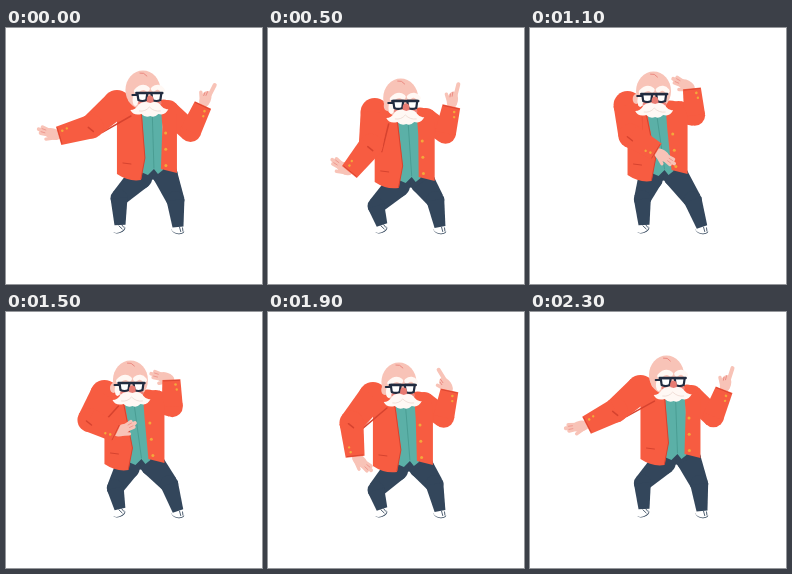
Recreate the animation shown at these times as an HTML page with a canvas. Size 256x256 px, loop 2400 ms.

```html
<!DOCTYPE html>
<html>
<head>
<meta charset="utf-8">
<style>
html, body { margin: 0; height: 100%; overflow: hidden; background: #fff; }
canvas { display: block; width: 100vw; height: 100vh; }
</style>
</head>
<body>
<canvas id="stage" width="256" height="256"></canvas>
<script>
const ctx = document.getElementById('stage').getContext('2d');
const RED = '#f75c41', SHADE = '#d6432f', TEAL = '#5bb0a7', DARK_TEAL = '#46988f';
const NAVY = '#33465b', INK = '#222c40', SKIN = '#f8c3b7', BLUSH = '#e9837b';
const WHITE = '#fff8f4', GOLD = '#f3a83b';
const STEP = 100, STEPS = 24, RAD = Math.PI / 180;

function fill(color, path) {
  ctx.fillStyle = color;
  ctx.fill(new Path2D(path));
}

function line(color, width, path) {
  ctx.strokeStyle = color;
  ctx.lineWidth = width;
  ctx.stroke(new Path2D(path));
}

function oval(color, x, y, rx, ry = rx) {
  const p = new Path2D();
  p.ellipse(x, y, rx, ry, 0, 0, 7);
  fill(color, p);
}

function at(x, y, angle, draw) {
  ctx.save();
  ctx.translate(x, y);
  ctx.rotate(angle);
  draw();
  ctx.restore();
}

// Tapered limb through [x, y, radius] joints with a flat end
function limb(color, ...joints) {
  joints.slice(1).forEach(([x, y, r], i) => {
    const [px, py, pr] = joints[i], length = Math.hypot(x - px, y - py);
    oval(color, px, py, pr);
    at(px, py, Math.atan2(y - py, x - px), () =>
      fill(color, `M0 ${-pr}L${length} ${-r}V${r}L0 ${pr}Z`));
  });
}

// Cosine over the loop, peaking at the given step
const wave = (t, peak, times = 1) => Math.cos(2 * Math.PI * times * (t - peak) / STEPS);

// Soft bump around the given step
const pulse = (t, peak, width) => Math.exp(-(((t - peak) / width) ** 2));

function poseAt(t) {
  const sway = wave(t, 0), curl = wave(t, 2.9), fling = pulse(t, 2, 1.3);
  const hx = 130 + 7 * wave(t, .5), hy = 65 - 8 * sway ** 4;

  // Left arm swings about the shoulder; the elbow bends off its midline
  const swing = (102 + 43 * wave(t, .3) + 5 * wave(t, 0, 3) + 15 * fling) * RAD;
  const reach = 65 + 16 * fling - 27 * pulse(t, 14, 3), bend = 5 - 17 * curl;
  const sx = hx - 26, sy = hy + 19, ux = Math.cos(swing), uy = Math.sin(swing);
  const left = {
    shoulder: [sx, sy, 14],
    elbow: [sx + ux * reach / 2 - uy * bend, sy + uy * reach / 2 + ux * bend, 12],
    wrist: [sx + ux * reach, sy + uy * reach, 9.5],
    angle: 1.8 + 2.3 * curl
  };

  const rx = hx + 25, ry = hy + 26;
  const right = {
    shoulder: [rx, ry, 11],
    elbow: [rx + 19 + 3 * sway + 6 * fling, ry + 12 + 9 * sway - 4 * fling, 10.5],
    wrist: [rx + 23 + 10 * sway + 22 * fling, ry - 15 + 9 * sway, 9],
    angle: -2 + .9 * wave(t, 1.8) + .3 * fling
  };
  return { hx, hy, bx: hx - 2, by: hy + 95, left, right, pointing: sway > 0 };
}

function hand({ wrist: [x, y], angle }, side, pointing) {
  at(x, y, angle, () => {
    ctx.scale(1, side);
    oval(SKIN, 6, 0, 9, 5.5);
    if (pointing) {
      line(SKIN, 4, 'M8-2L23-3');
      line(BLUSH, .8, 'M10 1H14M9 3H12');
    } else {
      line(SKIN, 3.8, 'M9-2L18-3M9 0L21 0M9 2L18 3');
      line(BLUSH, .6, 'M14-1.5L18-1.6M14 1.4L18 1.6');
    }
    line(SKIN, 3.4, 'M3 3L11 7');
  });
}

function arm({ shoulder, elbow, wrist }) {
  limb(RED, shoulder, elbow, wrist);
  at(wrist[0], wrist[1], Math.atan2(wrist[1] - elbow[1], wrist[0] - elbow[0]), () => {
    line(SHADE, .8, 'M-1-8V8');
    oval(GOLD, -5, 4, 1.3);
    oval(GOLD, -10, 5, 1.2);
  });
}

function shoe(x, y, angle) {
  at(x, y, angle, () => {
    oval(NAVY, 0, .6, 6.4, 3.4);
    oval('#fff', -.4, -.4, 6.6, 3.7);
    line(NAVY, .8, 'M1-3L3 1M4-3L5 0');
  });
}

function legs({ hx, hy, bx, by }) {
  const crouch = (hy - 57) / 8;
  shoe(113, 201, -.35);
  shoe(172, 202, .2);
  limb(NAVY, [bx + 2, by - 8, 8], [bx + 24, by - 9, 8]);
  limb(NAVY, [bx + 24, by - 6, 12.5], [166 + .5 * (hx - 130), 172, 9], [172, 199, 5.5]);
  limb(NAVY, [bx - 1, by - 3, 12.5], [113 - 5 * crouch, 170 + 8 * crouch, 8.5], [114, 197, 5.5]);
}

// How far the face is turned from the middle of the head
const turn = hx => (hx - 122) * .43;

function torso({ hx, hy, bx, by }) {
  const face = hx + turn(hx), top = hy + 22;
  const inner = face - 8, outer = face + 13;
  fill(TEAL, `M${inner} ${top}H${outer}L${bx + 22} ${by - 10}L${bx + 17} ${by - 6}
    L${bx + 13} ${by - 11}L${bx + 7} ${by - 5}L${bx} ${by - 8}Z`);
  line(DARK_TEAL, .8, `M${face + 3} ${hy + 32}L${bx + 13} ${by - 12}`);
  fill(RED, `M${hx - 14} ${hy + 8}Q${hx - 29} ${hy + 8} ${hx - 26} ${hy + 30}
    L${bx - 24} ${by - 6}Q${bx - 12} ${by + 2} ${bx} ${by}L${bx + 4} ${by - 22}L${inner} ${top}Z`);
  fill(RED, `M${outer - 2} ${hy + 15}Q${hx + 29} ${hy + 12} ${hx + 34} ${hy + 30}
    L${bx + 36} ${by - 7}L${bx + 20} ${by - 11}L${outer} ${hy + 42}Z`);
  line(SHADE, 1, `M${inner} ${top + 6}L${bx + 4} ${by - 22}L${bx} ${by - 1}m-18-16l8 1`);
  for (let k = .4; k < 1; k += .25) {
    oval(GOLD, outer + 3 + (bx + 22 - outer) * k, top + (by - top - 8) * k, 1.5);
  }
}

function head({ hx, hy }) {
  at(hx, hy, 0, () => {
    oval(SKIN, 0, 5, 17.5, 19.5);
    line(BLUSH, .9, 'M-3-12Q1-13 4-9');
    ctx.translate(turn(hx), 0);
    oval(SKIN, -18, 13, 3.5, 5);
    oval(WHITE, -14, 15, 2.8, 6);
    for (const x of [-8, 9]) oval(BLUSH, x, 18, 3.2, 2);
    line(WHITE, 5, 'M-13 6Q-7 0-2 4M4 4Q9 0 13 5');
    line(INK, 2, 'M-17 10H-12');
    for (const x of [-12, 2]) {
      const rim = `M${x} 8h10l-1 7q-4 2-8 0z`;
      fill('#fff', rim);
      line(INK, 2.2, rim);
    }
    line(INK, 2.4, 'M-13 8H13');
    oval('#e77b72', .8, 15, 3.4, 4.4);
    fill(WHITE, 'M1 18Q8 15 12 21Q15 25 19 24Q16 31 9 29Q5 33 1 31Q-4 33-8 29Q-16 31-19 25Q-14 25-11 20Q-7 15 1 18Z');
    line('#ecd8d1', .8, 'M-10 26Q-4 27 0 22Q5 27 11 26');
  });
}

function draw(t) {
  const pose = poseAt(t), { left, right } = pose;
  const [sx, sy] = left.shoulder, [ex, ey] = left.elbow;
  ctx.clearRect(0, 0, 256, 256);
  ctx.lineCap = ctx.lineJoin = 'round';
  legs(pose);
  hand(right, -1, pose.pointing);
  arm(right);
  torso(pose);
  line(SHADE, 1.5, `M${sx + 14} ${sy + 12}L${ex + 11} ${ey + 6}`);
  hand(left, left.angle > 2.2 ? -1 : 1, false);
  arm(left);
  line(SHADE, 1.5, `M${ex - 3} ${ey + 1}l5 4`);
  head(pose);
}

function tick() {
  draw(Math.floor(performance.now() / STEP) % STEPS);
  requestAnimationFrame(tick);
}
tick();
</script>
</body>
</html>
```
